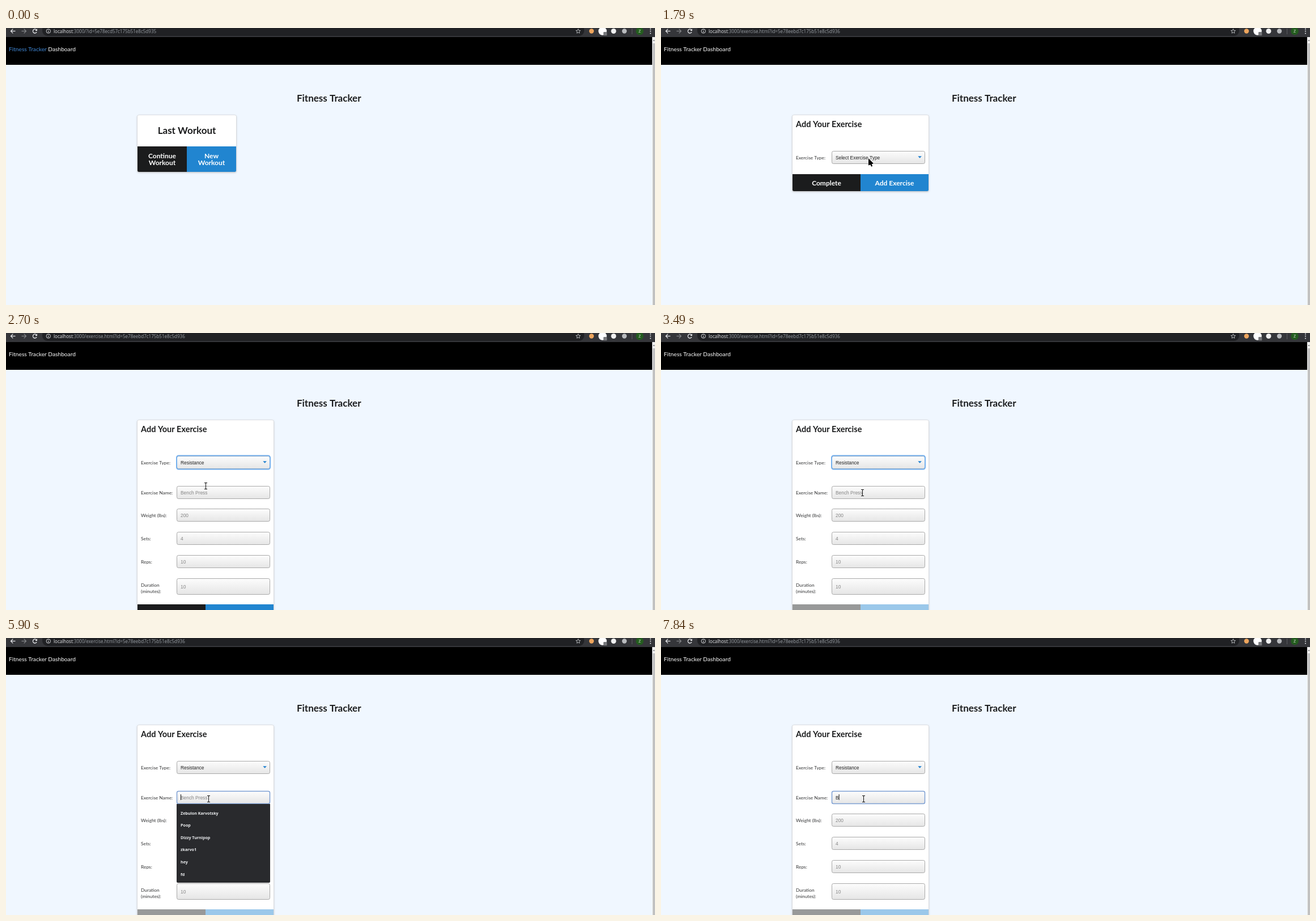
These frames come from a looping animation (1145 by 489 pixels, 8 s). An HTML page with a canvas:

```html
<!DOCTYPE html>
<html lang="en">
<head>
<meta charset="utf-8">
<title>Fitness Tracker</title>
<style>
html, body { margin: 0; width: 100%; height: 100%; overflow: hidden; background: #f0f7ff; }
canvas { display: block; width: 1145px; height: 489px; }
</style>
</head>
<body>
<canvas id="stage" width="1145" height="489"></canvas>
<script>
const ctx = document.getElementById('stage').getContext('2d');
const LOOP = 8000;
const INK = '#1b1c1d', BLUE = '#2185d0', PAGE = '#f0f7ff', LIGHT = '#e8eaed';
const lato = (size, weight = 400) => `${weight} ${size}px Lato, sans-serif`;
const ui = (size, weight = 400) => `${weight} ${size}px "Open Sans", sans-serif`;
const arial = '8.4px "Liberation Sans", Arial, sans-serif';

// Moments at which the scene changes, in ms.
const at = {
  enter: 210, press: 990, load: 1080, form: 1160, ready: 1240, click: 1855, list: 1930,
  pick: 2640, fade: 2790, focus: 3720, suggest: 3800, calm: 3880, type: 7840
};

// Short pointer moves: each glides from where the last one ended.
const glides = [
  { from: 1480, to: 1780, steps: 5, x: 366, y: 230 },
  { from: 2100, to: 2470, steps: 6, x: 352, y: 270 },
  { from: 2940, to: 3110, steps: 3, x: 352, y: 273 },
  { from: 3260, to: 3490, steps: 4, x: 355, y: 282 },
  { from: 4030, to: 4190, steps: 3, x: 357, y: 284 }
];

const mix = (a, b, f) => a + (b - a) * f;
const clamp = f => Math.max(0, Math.min(1, f));

// The pointer sweeps in on an eased curve, then follows the glides in held steps.
function pointer(t) {
  if (t < at.enter) return null;
  const held = Math.floor((t - at.enter) / 78) / 10;
  const f = 1 - (1 - clamp(held)) ** 1.6;
  let x = mix(mix(620, 437, f), mix(437, 386, f), f);
  let y = mix(mix(430, 386, f), mix(386, 226, f), f);
  for (const g of glides) {
    if (t < g.from) break;
    const gap = (g.to - g.from) / (g.steps - 1);
    const k = clamp((Math.floor((t - g.from) / gap) + 1) / g.steps);
    x = mix(x, g.x, k);
    y = mix(y, g.y, k);
  }
  return { x, y };
}

function rect(x, y, w, h, fill) {
  ctx.fillStyle = fill;
  ctx.fillRect(x, y, w, h);
}

function paint(fill, stroke, width = 1) {
  if (fill) { ctx.fillStyle = fill; ctx.fill(); }
  if (stroke) { ctx.strokeStyle = stroke; ctx.lineWidth = width; ctx.stroke(); }
}

function round(x, y, w, h, r, ...style) {
  ctx.beginPath();
  ctx.roundRect(x, y, w, h, r);
  paint(...style);
}

function dot(x, y, r, ...style) {
  ctx.beginPath();
  ctx.arc(x, y, r, 0, Math.PI * 2);
  paint(...style);
}

function line(color, width, ...pts) {
  ctx.beginPath();
  pts.forEach(p => ctx.lineTo(...p));
  paint(null, color, width);
}

function shape(pts, ...style) {
  ctx.beginPath();
  pts.forEach(p => ctx.lineTo(...p));
  ctx.closePath();
  paint(...style);
}

function text(str, x, y, font, color, align = 'left') {
  ctx.font = font;
  ctx.fillStyle = color;
  ctx.textAlign = align;
  ctx.fillText(str, x, y);
  return ctx.measureText(str).width;
}

function shadowed(color, blur, dy, drawIt) {
  ctx.save();
  ctx.shadowColor = color;
  ctx.shadowBlur = blur;
  ctx.shadowOffsetY = dy;
  drawIt();
  ctx.restore();
}

function navArrow(x, dir, color) {
  const tip = x + 4 * dir, bend = x + 0.2 * dir;
  line(color, 1.2, [x - 4 * dir, 5.5], [tip, 5.5]);
  line(color, 1.2, [bend, 1.7], [tip, 5.5], [bend, 9.3]);
}

function star(x, y) {
  const pts = Array.from({ length: 10 }, (_, i) => {
    const a = i * Math.PI / 5 - Math.PI / 2, r = i % 2 ? 1.9 : 4.2;
    return [x + r * Math.cos(a), y + r * Math.sin(a)];
  });
  shape(pts, null, '#d5d7da', 0.8);
}

function reload(busy) {
  if (busy) {
    for (const s of [-3.5, 3.5]) line(LIGHT, 1.3, [51 - s, 2], [51 + s, 9]);
    return;
  }
  ctx.beginPath();
  ctx.arc(51, 5.5, 3.5, 0.5, 5.4);
  paint(null, LIGHT, 1.3);
  shape([[55, 1.3], [55, 5], [51.3, 5]], LIGHT);
}

function browserBar(t) {
  const busy = t >= at.load && t < at.ready;
  rect(0, 0, 1145, 16, '#35363a');
  round(64, -6, 956, 20, 9, '#202124');
  navArrow(12.5, -1, LIGHT);
  navArrow(31.5, 1, '#85878a');
  reload(busy);

  dot(74.8, 5.5, 3.7, null, LIGHT, 0.9);
  rect(74.3, 5, 1, 2.8, LIGHT);
  rect(74.3, 3, 1, 1, LIGHT);
  const path = t < at.load ? '/?id=5e78ecd57c175b51e8c5d935'
    : '/exercise.html' + (busy ? '' : '?id=5e78eebd7c175b51e8c5d936');
  const w = text('localhost', 84, 8.5, ui(8.05), LIGHT);
  text(':3000' + path, 84 + w, 8.5, ui(8.05), '#9aa0a6');

  star(1009.5, 5.8);
  dot(1033, 5.5, 4.2, '#eda55d');
  dot(1052.5, 5.5, busy ? 3 : 7.3, '#fff');
  round(1054, 7, 6.3, 6.3, 1, '#77787b');
  dot(1072, 5.5, 4.5, '#f1f1f1');
  dot(1091, 5.5, 4.2, '#b9bbbe');
  rect(1104, 1, 1, 10, '#5b5c60');
  dot(1118, 5.5, 6.8, '#245c1f');
  text('Z', 1118, 8.2, ui(7), '#e3ece2', 'center');
  for (let i = 0; i < 3; i++) dot(1137, 1.8 + 3.8 * i, 1, LIGHT);
}

function pageFrame(home) {
  rect(0, 16, 1145, 473, PAGE);
  rect(0, 16, 1140, 49, '#000');
  rect(1140, 16, 5, 473, '#f1f1f1');
  rect(1141, 27, 4, 462, '#c1c1c1');
  shape([[1141.3, 23], [1143, 20.5], [1144.7, 23]], '#777');
  const w = text('Fitness Tracker', 5, 41, lato(10.2), home ? '#4189d8' : '#fff');
  text(' Dashboard', 5 + w, 41, lato(10.2), '#fff');
  text('Fitness Tracker', 569.7, 130, lato(17, 700), INK, 'center');
}

function card(w, h) {
  shadowed('#c4c6c9', 3, 1, () => round(231.5, 153.5, w + 1, h + 1, 3, '#d4d4d5'));
  round(232, 154, w, h, 2.5, '#fff');
}

// A pair of buttons; a newline in a caption starts a second row.
function buttons(y, w, h, captions, colors) {
  captions.forEach((caption, i) => {
    const x = 232 + w * i, rows = caption.split('\n');
    round(x, y, w, h, [0, 0, i ? 2.5 : 0, i ? 0 : 2.5], colors[i]);
    rows.forEach((s, j) => text(s, x + w / 2, y + h / 2 + 4.5 + 12 * (j - (rows.length - 1) / 2),
      lato(12, 700), '#fff', 'center'));
  });
}

const overButton = p => p && p.x < 406 && p.y < 254;

function homePage(t, p) {
  const blue = !overButton(p) ? BLUE : t < at.press ? '#1678c2' : '#1a69a4';
  card(174, 100);
  text('Last Workout', 319, 187, lato(17, 700), INK, 'center');
  buttons(209, 87, 45, ['Continue\nWorkout', 'New\nWorkout'], [INK, blue]);
}

function field(y, h, value, color, focus) {
  const g = ctx.createLinearGradient(0, y, 0, y + h);
  g.addColorStop(0, '#fdfdfd');
  g.addColorStop(1, '#e5e5e5');
  round(301.5, y + 0.5, 164, h - 1, 2.8, g, focus ? '#7d9fd3' : '#a9a9a9', focus ? 1.5 : 1);
  text(value, 308, y + h / 2 + 3, arial, color);
}

const label = (s, y) => text(s, 238, y, lato(8.4), '#333435');

function typePicker(t) {
  label('Exercise Type:', 232);
  field(217, 23, t >= at.pick ? 'Resistance' : 'Select Exercise Type', '#222');
  if (t >= at.click && t < at.focus) round(301, 216.5, 165, 24, 3.5, null, '#74b0ee', 2);
  shape([[453.3, 226.2], [459.9, 226.2], [456.6, 229.8]], '#1f7fcf');
}

function optionList(p) {
  shadowed('rgba(0,0,0,.25)', 6, 3, () => rect(302, 240, 163.5, 46, '#fff'));
  const row = p.y > 255.5 ? 1 : 0;
  ['Select Exercise Type', 'Resistance', 'Cardio'].forEach((s, i) => {
    const y = 240.5 + 15 * i;
    if (i === row) rect(302.5, y, 162.5, 15, '#1e90ff');
    text(s, 305, y + 10.6, arial, i === row ? '#fff' : '#222');
  });
  round(302, 240.5, 163.5, 45.5, 0, null, '#8d8d8d', 0.8);
}

function exerciseForm(t) {
  const focus = t >= at.focus, typed = t >= at.type, hint = '#858585';
  const names = ['Exercise Name:', 'Weight (lbs):', 'Sets:', 'Reps:', 'Duration'];
  const hints = ['Bench Press', '200', '4', '10', '10'];
  names.forEach((name, i) => {
    const y = Math.round(269.5 + 40.75 * i), mine = typed && i === 0;
    label(name, y + 15);
    field(y, i === 4 ? 29 : 23, mine ? 'B' : hints[i], mine ? '#222' : hint, focus && i === 0);
  });
  label('(minutes):', 459);

  const blink = Math.floor((t - 4260) / 545);
  if (typed || (focus && (blink < 0 || blink % 2))) rect(typed ? 313.6 : 308, 276, 1, 10, '#111');
}

function suggestions() {
  round(301, 293, 165, 139, [0, 0, 2, 2], '#292a2d');
  ['Zebulon Karvotsky', 'Poop', 'Dizzy Turnipop', 'zkarvo1', 'hey', 'fd']
    .forEach((s, i) => text(s, 308, 311.5 + 21.6 * i, ui(7.15, 700), '#eceef0'));
}

function exercisePage(t, p) {
  const open = t >= at.pick;
  card(240, open ? 356 : 134);
  text('Add Your Exercise', 238, 175, lato(14.5, 700), INK);
  typePicker(t);
  if (open) {
    buttons(479, 120, 31, ['', ''], t >= at.fade ? ['#989999', '#9bc8ea'] : [INK, BLUE]);
    exerciseForm(t);
    if (t >= at.suggest && t < at.type) suggestions();
  } else {
    buttons(258, 120, 30, ['Complete', 'Add Exercise'], [INK, BLUE]);
    if (t >= at.list) optionList(p);
  }
}

function textCursor() {
  line('#111', 1, [0, -5.5], [0, 5.5]);
  for (const y of [-5.5, 5.5]) line('#111', 1, [-2.5, y], [2.5, y]);
}

function hand() {
  for (const style of [[null, '#111', 1.8], ['#fff']]) {
    round(-1.2, 0.5, 2.4, 8, 1.2, ...style);
    round(-3, 4, 8.8, 7, 2.8, ...style);
  }
}

function arrow() {
  for (const [color, grow] of [['#fff', 1], ['#000', 0]]) {
    shape([[0, 0], [0, 12.6], [9, 9.2]], color, grow && color, grow);
    line(color, 2.3 + grow, [3.2, 8], [6.1, 14.2]);
  }
}

function drawPointer(t, p) {
  const clicking = (t >= at.click && t < at.list) || (t >= at.focus && t < at.calm);
  if (clicking) dot(p.x, p.y, 8.8, 'rgba(255,240,30,.62)');
  ctx.save();
  if (t >= at.pick) {
    ctx.translate(Math.floor(p.x) + 0.5, Math.floor(p.y));
    textCursor();
  } else {
    ctx.translate(p.x, p.y);
    (t < at.form && overButton(p) ? hand : arrow)();
  }
  ctx.restore();
}

function draw(t) {
  const home = t < at.form, p = pointer(t);
  pageFrame(home);
  (home ? homePage : exercisePage)(t, p);
  browserBar(t);
  if (p) drawPointer(t, p);
}

let begin;
function tick(now) {
  begin ??= now;
  draw((now - begin) % LOOP);
  requestAnimationFrame(tick);
}
draw(0);
requestAnimationFrame(tick);
</script>
</body>
</html>
```
